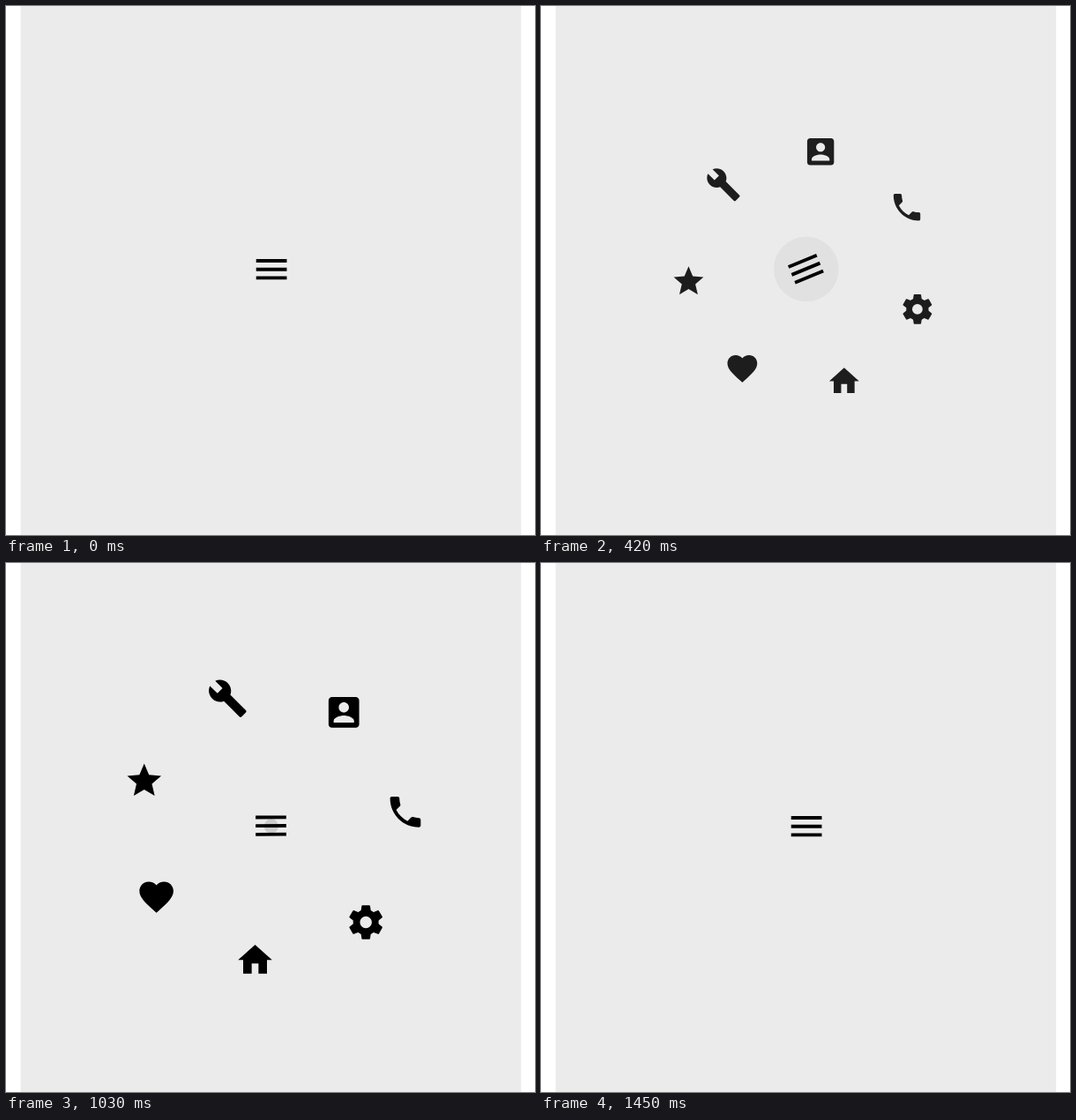
Recreate the animation shown at these times as an HTML page. Size 600 by 600 pixels, loop 1560 ms.

```html
<!DOCTYPE html>
<html lang="en">
<head>
<meta charset="utf-8">
<title>Radial menu</title>
<style>
html, body { margin: 0; width: 100%; height: 100%; overflow: hidden; background: #fff; }
svg { display: block; width: 100%; height: 100%; }
</style>
</head>
<body>
<svg viewBox="0 0 600 600">
  <defs>
    <path id="tooth" d="M9 7 9.13 5.07 9.51 2.42Q9.6 2 10 2h4Q14.4 2 14.49 2.42L14.87 5.07 15 7z"/>
  </defs>
  <rect x="16.6" width="567.6" height="600" fill="#ebebeb"/>
  <circle id="ripple" cx="300.8" cy="298.4"/>
  <g id="burger"><path d="M3 6h18v2H3zM3 11h18v2H3zM3 16h18v2H3z"/></g>
  <g id="icons">
    <path d="M10 20v-6h4v6h5v-8h3L12 3 2 12h3v8z"/>
    <path d="M12 21.35l-1.45-1.32C5.4 15.36 2 12.28 2 8.5 2 5.42 4.42 3 7.5 3c1.74 0 3.41.81 4.5 2.09C13.09 3.81 14.76 3 16.5 3 19.58 3 22 5.42 22 8.5c0 3.78-3.4 6.86-8.55 11.54z"/>
    <path d="M12 17.27 18.18 21l-1.64-7.03L22 9.24l-7.19-.61L12 2 9.19 8.63 2 9.24l5.46 4.73L5.82 21z"/>
    <path d="M22.7 19l-9.1-9.1c.9-2.3.4-5-1.5-6.9-2-2-5-2.4-7.4-1.3L9 6 6 9 1.6 4.7C.4 7.1.9 10.1 2.9 12.1c1.9 1.9 4.6 2.4 6.9 1.5l9.1 9.1c.4.4 1 .4 1.4 0l2.3-2.3c.5-.4.5-1.1.1-1.4z"/>
    <path d="M3 5v14c0 1.1.89 2 2 2h14c1.1 0 2-.9 2-2V5c0-1.1-.9-2-2-2H5c-1.11 0-2 .9-2 2zm12 4c0 1.66-1.34 3-3 3s-3-1.34-3-3 1.34-3 3-3 3 1.34 3 3zm-9 8c0-2 4-3.1 6-3.1s6 1.1 6 3.1v1H6v-1z"/>
    <path d="M6.62 10.79c1.44 2.83 3.76 5.14 6.59 6.59l2.2-2.2c.27-.27.67-.36 1.02-.24 1.12.37 2.33.57 3.57.57.55 0 1 .45 1 1V20c0 .55-.45 1-1 1-9.39 0-17-7.61-17-17 0-.55.45-1 1-1h3.5c.55 0 1 .45 1 1 0 1.25.2 2.45.57 3.57.11.35.03.74-.25 1.02z"/>
    <g>
      <circle cx="12" cy="12" r="5.5" fill="none" stroke="#000" stroke-width="4"/>
      <use href="#tooth"/>
      <use href="#tooth" transform="rotate(60 12 12)"/>
      <use href="#tooth" transform="rotate(120 12 12)"/>
      <use href="#tooth" transform="rotate(180 12 12)"/>
      <use href="#tooth" transform="rotate(240 12 12)"/>
      <use href="#tooth" transform="rotate(300 12 12)"/>
    </g>
  </g>
</svg>
<script>
const LOOP = 1560, STEP = 30;
const CX = 300.8, CY = 298.4, RADIUS = 153.2, UNIT = 1.93;
const END_ANGLE = 97.1, SWEEP = 207;
const OPEN = { tap: 150, start: 157, length: 439, end: 640 };
const CLOSE = { tap: 1030, start: 1019, length: 481, end: 1450 };

const ripple = document.getElementById('ripple');
const burger = document.getElementById('burger');
const icons = [...document.getElementById('icons').children];
const clamp = x => Math.min(1, Math.max(0, x));

// cubic-bezier(.4, 0, .2, 1)
function ease(x) {
  let lo = 0, hi = 1;
  for (let i = 0; i < 24; i++) {
    const s = (lo + hi) / 2, q = 1 - s;
    if (1.2 * q * q * s + 0.6 * q * s * s + s ** 3 < x) lo = s; else hi = s;
  }
  return lo * lo * (3 - 2 * lo);
}

function progress(phase, t) {
  if (t < phase.tap) return 0;
  if (t >= phase.end) return 1;
  return ease(clamp((t - phase.start) / phase.length));
}

// The picture advances in steps while a phase runs.
const snap = (t, phase) => t >= phase.end ? t : phase.tap + Math.floor((t - phase.tap) / STEP) * STEP;

function drawRipple(age, on) {
  const grow = 1 - (1 - clamp((age + 10) / 125)) ** 3;
  const fade = (1 - clamp((age - 180) / 216)) ** 2;
  ripple.setAttribute('r', 36.8 * grow);
  ripple.setAttribute('opacity', on ? 0.128 * fade : 0);
}

function draw(time) {
  const phase = time < CLOSE.tap ? OPEN : CLOSE;
  const t = snap(time, phase);
  const p = phase === OPEN ? progress(OPEN, t) : 1 - progress(CLOSE, t);

  drawRipple(t - phase.tap, t >= phase.tap && t < phase.end);
  burger.setAttribute('transform',
    `translate(${CX} ${CY}) rotate(${180 * p}) translate(.3 .3) scale(${UNIT}) translate(-12 -12)`);

  icons.forEach((icon, i) => {
    const a = (END_ANGLE - SWEEP * (1 - p) + i * 360 / icons.length) * Math.PI / 180;
    const x = CX + RADIUS * p * Math.cos(a), y = CY + RADIUS * p * Math.sin(a);
    icon.setAttribute('transform', `translate(${x} ${y}) scale(${UNIT * p}) translate(-12 -12)`);
    icon.setAttribute('opacity', p);
  });
}

const begin = performance.now();
function tick() {
  draw((performance.now() - begin) % LOOP);
  requestAnimationFrame(tick);
}
tick();
</script>
</body>
</html>
```
